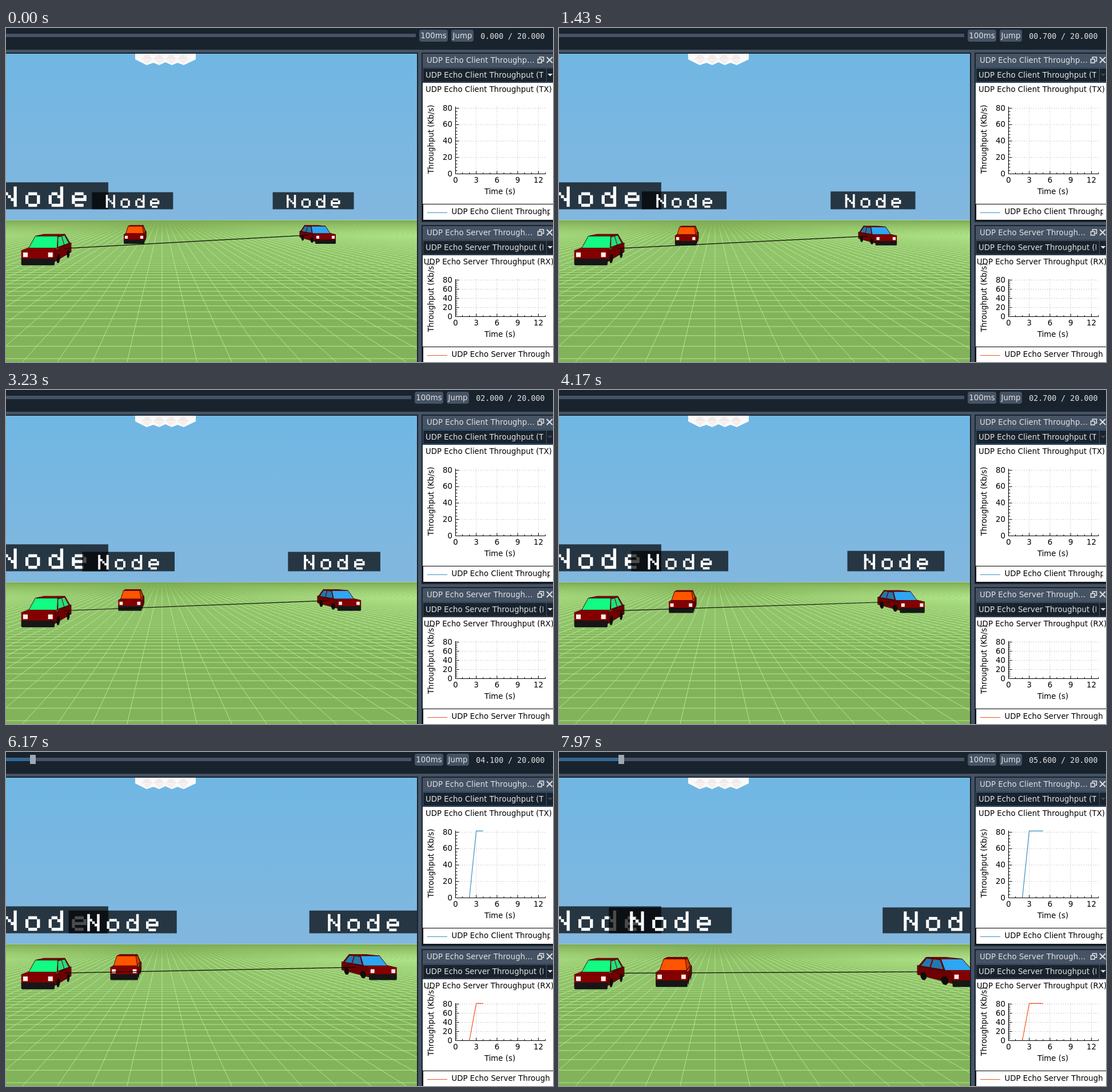
Animation, 957 px wide and 585 px high, one loop 8 s. Source, as an HTML page with a canvas:

```html
<!DOCTYPE html>
<html>
<head>
<meta charset="utf-8">
<style>
html, body { margin: 0; width: 100%; height: 100%; overflow: hidden; background: #19232d; }
canvas { display: block; }
</style>
</head>
<body>
<canvas id="stage" width="957" height="585"></canvas>
<script>
const ctx = document.getElementById('stage').getContext('2d');
const DARK = '#19232d', SLATE = '#455364', PALE = '#e0e1e3';
const SANS = '13.33px "DejaVu Sans", sans-serif';
const MONO = '13.33px "DejaVu Sans Mono", monospace';
const LOOP = 8000;

// Wall time (ms) against simulated time (s)
const CLOCK = [[500, .07], [830, .32], [1970, 1.12], [3230, 2.03], [4430, 3.01], [5170, 3.43],
  [6030, 4.01], [6970, 4.82], [7230, 5.01], [8000, 5.66]];

// 5x7 letters, one bit mask per row
const GLYPHS = [
  [17, 17, 25, 21, 19, 17, 17],
  [0, 0, 14, 17, 17, 17, 14],
  [1, 1, 13, 19, 17, 17, 15],
  [0, 0, 14, 17, 31, 16, 14]
];

// Camera: vanishing point; x and y are in pixels at depth 1
const VX = 273, VY = 317, CAR_W = 36, SPEED = .0634;
// Ground grid: one cell in those pixels, camera height, focal length
const CELL = 13.9, EYE = 61, FOCAL = 657;
const NODES = [
  { x: -152, z: .617, label: -136.5, glass: '#12fb82', side: '#22e07c' },
  { x: -67, z: 1, label: -54, glass: '#ff5500', side: '#d94800', moves: true },
  { x: 268, z: 1, label: 276.5, glass: '#2ea6f2', side: '#2178ae', moves: true }
];

const project = (x, y, z) => [VX + x / z, VY + y / z];

function simTime(t) {
  if (t < CLOCK[0][0]) return 0;
  const i = CLOCK.findIndex(k => t < k[0]);
  const [t0, s0] = CLOCK[i - 1], [t1, s1] = CLOCK[i];
  return Math.floor((s0 + (s1 - s0) * (t - t0) / (t1 - t0)) * 10) / 10;
}

function rect(x, y, w, h, color) {
  ctx.fillStyle = color;
  ctx.fillRect(x, y, w, h);
}

function path(points) {
  ctx.beginPath();
  points.forEach(p => ctx.lineTo(p[0], p[1]));
}

function poly(points, color, edge) {
  path(points);
  ctx.closePath();
  ctx.fillStyle = color;
  ctx.fill();
  if (edge) {
    ctx.strokeStyle = edge;
    ctx.lineWidth = 1;
    ctx.stroke();
  }
}

function line(points, color, width = 1) {
  path(points);
  ctx.strokeStyle = color;
  ctx.lineWidth = width;
  ctx.stroke();
}

function text(str, x, y, color, align = 'left', font = SANS) {
  ctx.font = font;
  ctx.fillStyle = color;
  ctx.textAlign = align;
  ctx.fillText(str, x, y);
}

function clipped(x, y, w, h, draw) {
  ctx.save();
  ctx.beginPath();
  ctx.rect(x, y, w, h);
  ctx.clip();
  draw();
  ctx.restore();
}

function fade(y0, y1, c0, c1) {
  const g = ctx.createLinearGradient(0, y0, 0, y1);
  g.addColorStop(0, c0);
  g.addColorStop(1, c1);
  rect(0, y0, 719, y1 - y0, g);
}

function drawLandscape() {
  fade(45, 337, '#70b7e4', '#82b7de');
  poly([[226, 45], [332, 45], [332, 55], [311, 65], [300, 61], [290, 65], [279, 60],
    [268, 65], [258, 61], [246, 65], [226, 55]], '#fbfafa');
  for (let x = 236; x < 310; x += 21) {
    poly([[x, 55], [x + 11, 45], [x + 21, 55]], '#f0eaea');
    poly([[x + 3, 56], [x + 19, 56], [x + 11, 63]], '#f3eeee');
  }

  rect(0, 337, 719, 248, '#82b35b');
  const spread = CELL / EYE, reach = FOCAL * EYE / CELL;
  for (let i = -100; i <= 100; i++) {
    line([[VX + i * spread * 20, VY + 20], [VX + i * spread * 270, VY + 270]], 'rgba(190,243,152,.8)');
  }
  for (let n = 10; n < 150; n++) {
    const y = VY + reach / n, gap = reach / n / n;
    ctx.globalAlpha = Math.min(.85, gap / 4);
    line([[0, y], [719, y]], '#bef398');
  }
  ctx.globalAlpha = 1;
  fade(337, 364, 'rgba(126,170,82,1)', 'rgba(126,170,82,0)');
}

function drawCar({ x, z, glass, side }) {
  const at = (dx, y, d) => project(x + dx, y, z + d);
  const face = (pts, color, edge) => poly(pts.map(p => at(...p)), color, edge);
  const box = (a, b, top, bottom, color) =>
    face([[a, top, 0], [b, top, 0], [b, bottom, 0], [a, bottom, 0]], color);
  // The flank turned towards the middle of the view
  const onRight = x < 0, flank = onRight ? CAR_W : 0, inset = onRight ? -1 : 1;
  const wheel = (dx, d) => {
    const pts = [];
    for (let a = 0; a < 8; a++) {
      const r = (a + .5) * Math.PI / 4;
      pts.push([dx, 55.5 + 5.3 * Math.sin(r), d + .011 * Math.cos(r)]);
    }
    face(pts, '#0d0d0d');
  };

  wheel(CAR_W - flank, .02);
  face([[flank, 45, 0], [flank, 44, .03], [flank, 43, .112], [flank, 55, .112], [flank, 57, 0]], '#6d0000', '#3c0000');
  face([[flank + 2 * inset, 44, .026], [flank + 5 * inset, 31.5, .046], [flank + 5 * inset, 31.5, .095],
    [flank + inset, 43.5, .11]], '#700000', '#300000');
  face([[flank + 2 * inset, 43, .032], [flank + 5 * inset, 33, .049], [flank + 5 * inset, 33, .07],
    [flank + 2 * inset, 43, .07]], side);
  face([[flank + 2 * inset, 43, .074], [flank + 5 * inset, 33, .074], [flank + 5 * inset, 33, .092],
    [flank + 2 * inset, 43, .104]], side);
  wheel(flank, .022);
  wheel(flank, .09);
  face([[0, 45, 0], [CAR_W, 45, 0], [CAR_W - 2, 43.7, .026], [2, 43.7, .026]], '#8c0000', '#4a0000');
  face([[5, 31.5, .046], [31, 31.5, .046], [31, 31.5, .095], [5, 31.5, .095]], '#7a0000', '#5a0000');
  face([[2, 44, .026], [5, 31.5, .046], [31, 31.5, .046], [34, 44, .026]], glass, '#5a0000');
  box(0, CAR_W, 45, 54, '#850000');
  box(2, 7, 47, 52, '#fff0ec');
  box(29, 34, 47, 52, '#fff0ec');
  face([[0, 53.5, 0], [CAR_W, 53.5, 0], [CAR_W, 60, 0], [CAR_W - 1, 61, 0], [1, 61, 0], [0, 60, 0]], '#161616');
}

function drawLabel({ label, z }) {
  const depth = z + .045, w = 148.4 / depth, h = w / 4.75;
  const left = VX + label / depth - w / 2, top = 317.5 - h, cell = h * .1067;
  rect(left, top, w, h, 'rgba(0,0,0,.7)');
  GLYPHS.forEach((rows, g) => rows.forEach((bits, r) => {
    for (let c = 0; c < 5; c++) {
      if (bits >> (4 - c) & 1) {
        rect(left + w * (.172 + g * .1814) + c * cell, top + h * .155 + r * cell, cell + .3, cell + .3, '#fff');
      }
    }
  }));
}

function drawLink(from, to) {
  const centre = n => project(n.x + CAR_W / 2, 47.5, n.z + .056);
  const [x0, y0] = centre(from), [x1, y1] = centre(to);
  const yAt = x => y0 + (y1 - y0) * (x - x0) / (x1 - x0);
  const end = x1 - 15 / to.z;
  line([[102, yAt(102)], [end, yAt(end)]], '#080808', 1.2);
}

function drawScene(s) {
  const [green, orange, blue] = NODES.map(n => n.moves ? { ...n, z: n.z - SPEED * s } : n);
  drawLandscape();
  const link = () => drawLink(green, blue);
  if (s >= 5) link();
  drawCar(orange);
  drawCar(blue);
  drawCar(green);
  if (s < 5) link();
  [green, orange, blue].forEach(drawLabel);
}

function drawButton(label, x, w) {
  ctx.beginPath();
  ctx.roundRect(x, 3, w, 21, 4);
  ctx.fillStyle = SLATE;
  ctx.fill();
  text(label, x + w / 2, 18, PALE, 'center');
}

function drawToolbar(s) {
  const shift = s > 0 ? -8 : 0, knob = Math.round(17.6 + 41.4 * (s - 3.4));
  rect(0, 0, 957, 45, DARK);
  rect(0, 10, 717 + shift, 6, SLATE);
  if (knob > -6) {
    rect(0, 10, knob, 6, '#346792');
    rect(knob - 5, 5, 10, 16, '#9da9b5');
  }
  drawButton('100ms', 723 + shift, 50);
  drawButton('Jump', 779 + shift, 39);
  const clock = s > 0 ? s.toFixed(3).padStart(6, '0') : '0.000';
  text(clock + ' / 20.000', 942.5, 19, PALE, 'right', MONO);
  rect(0, 38, 957, 5, SLATE);
}

function drawDockHead(side, top, dimArrow) {
  rect(729, top, 228, 24.5, SLATE);
  text(side === 'Client' ? 'UDP Echo Client Throughp…' : 'UDP Echo Server Through…', 736, top + 16, PALE);
  ctx.strokeStyle = PALE;
  ctx.lineWidth = 1.6;
  ctx.strokeRect(933.5, top + 6, 7, 7);
  rect(930, top + 9, 8, 8, SLATE);
  ctx.strokeRect(930.5, top + 9.5, 6.5, 6.5);
  line([[946, top + 6], [956, top + 16]], PALE, 2);
  line([[956, top + 6], [946, top + 16]], PALE, 2);

  ctx.strokeStyle = dimArrow ? '#346792' : SLATE;
  ctx.lineWidth = 1;
  ctx.strokeRect(729.5, top + 25.5, 240, 24);
  clipped(730, top + 25, 210, 25, () => text(`UDP Echo ${side} Throughput (${side === 'Client' ? 'T' : 'R'}X)`, 734, top + 42, PALE));
  line([[945.5, top + 26], [945.5, top + 50]], SLATE);
  poly([[947.5, top + 35], [956.5, top + 35], [952, top + 39.5]], dimArrow ? '#3c4958' : PALE);
}

function drawPlot({ side, unit, head, base, step, labelY, color }, s) {
  const X = v => 786.5 + v * 12.08, Y = v => base - v * step / 20;
  const name = `UDP Echo ${side} Throughput`;
  rect(729, head + 51, 228, base + 81.5 - head - 51, '#fff');

  ctx.setLineDash([1, 3]);
  for (let v = 3; v <= 12; v += 3) line([[X(v), Y(82)], [X(v), base]], '#aaa');
  for (let v = 20; v <= 80; v += 20) line([[786, Y(v)], [944, Y(v)]], '#aaa');
  ctx.setLineDash([]);

  line([[786.5, Y(82)], [786.5, base], [944, base]], '#000');
  for (let v = 0; v <= 13; v++) {
    line([[X(v), base], [X(v), base - (v % 3 ? 2.5 : 5)]], '#000');
    if (v % 3 === 0) text(v, X(v), base + 15.5, '#000', 'center');
  }
  for (let v = 0; v <= 80; v += 4) {
    line([[786, Y(v)], [v % 20 ? 789.5 : 792.5, Y(v)]], '#000');
    if (v % 20 === 0) text(v, 781, Math.round(Y(v) + 4), '#000', 'right');
  }
  text(`${name} (${unit})`, 844.5, head + 67, '#000', 'center');
  text('Time (s)', 864, base + 35.5, '#000', 'center');
  ctx.save();
  ctx.translate(748, labelY);
  ctx.rotate(-Math.PI / 2);
  text('Throughput (Kb/s)', 0, 0, '#000', 'center');
  ctx.restore();

  if (s >= 3) line([[X(2), base], [X(3), Y(81.5)], [X(Math.floor(s)), Y(81.5)]], color, 1.2);

  line([[729, base + 53], [957, base + 53]], '#000');
  line([[729.5, base + 53], [729.5, base + 81]], '#000');
  line([[729, base + 81], [957, base + 81]], '#000');
  line([[737, base + 68], [772, base + 68]], color);
  clipped(729, base + 54, 223, 26, () => text(name, 779.5, base + 70.5, '#000'));
}

function drawCursor(t) {
  if (t < 700 || t > 1430) return;
  const dt = t - 830;
  ctx.save();
  ctx.translate(565 + .65 * dt, 13 + .115 * dt);
  path([[0, 0], [41, 24], [25, 28], [35, 37], [28, 42], [16, 31], [3, 35]]);
  ctx.closePath();
  ctx.fillStyle = '#000';
  ctx.strokeStyle = '#fff';
  ctx.lineWidth = 3;
  ctx.fill();
  ctx.stroke();
  ctx.restore();
}

const PLOTS = [
  { side: 'Client', unit: 'TX', head: 45, base: 255.5, step: 28.75, labelY: 195, color: '#3a8fc0' },
  { side: 'Server', unit: 'RX', head: 347, base: 505.5, step: 16, labelY: 472, color: '#f4511e' }
];

function frame(now) {
  const t = now % LOOP, s = simTime(t);
  rect(0, 0, 957, 585, DARK);
  clipped(0, 45, 719, 540, () => drawScene(s));
  drawToolbar(s);
  rect(721, 43, 6, 542, SLATE);
  rect(727, 340, 230, 5, SLATE);
  PLOTS.forEach((plot, i) => {
    drawDockHead(plot.side, plot.head, i === 0 && t >= 1430);
    drawPlot(plot, s);
  });
  drawCursor(t);
  requestAnimationFrame(frame);
}
requestAnimationFrame(frame);
</script>
</body>
</html>
```
